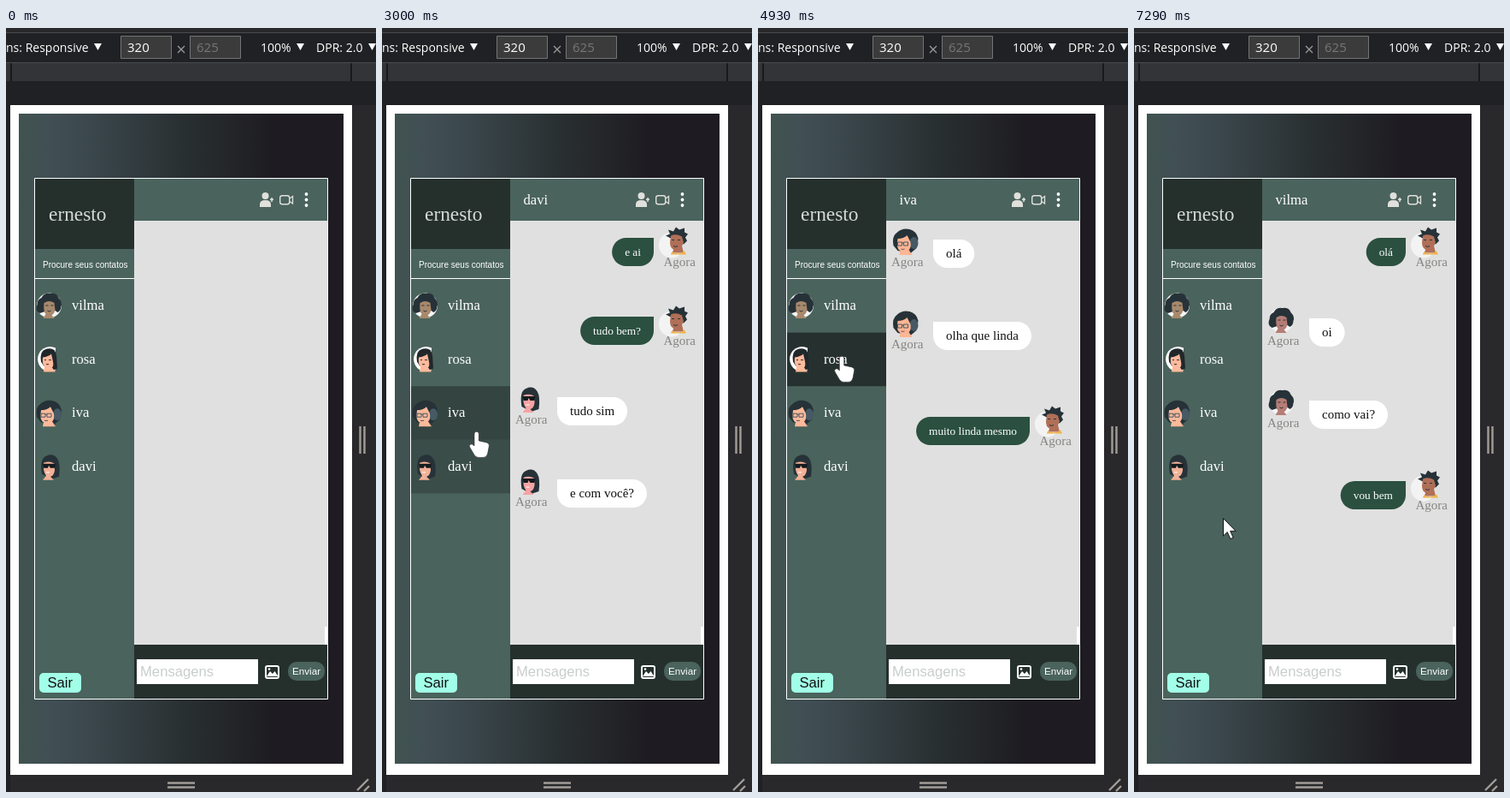
An HTML page for the animation above (8 s loop, 433 px wide and 892 px high).

```html
<!DOCTYPE html>
<html lang="pt">
<head>
<meta charset="utf-8">
<title>Chat</title>
<style>
html, body { margin: 0; width: 100%; height: 100%; overflow: hidden; background: #202124; }
svg { display: block; }
text { font-family: "Liberation Serif", serif; font-size: 16.67px; fill: #fff; }
.ui { font: 14px "Open Sans", sans-serif; }
.sans { font-family: "Liberation Sans", sans-serif; }
.hide { visibility: hidden; }
</style>
</head>
<body>
<svg id="stage" width="433" height="892" viewBox="0 0 433 892">
  <defs>
    <linearGradient id="bg">
      <stop offset="0" stop-color="#40534f"/>
      <stop offset=".1" stop-color="#414f55"/>
      <stop offset=".3" stop-color="#364145"/>
      <stop offset=".5" stop-color="#293032"/>
      <stop offset=".78" stop-color="#1e1c22"/>
    </linearGradient>
    <g id="curly">
      <circle r="14.5" fill="#f5f5f5"/>
      <path d="M-11 9Q-17 6-14-1Q-14-7-9-9Q-6-15 1-14Q9-15 11-9Q16-4 14 1Q14 6 10 8L4 4z" fill="#263238"/>
      <path d="M-6-3Q0-7 6-3L7 5Q6 10 3 11L6 15H-7L-4 10Q-7 7-6-3z" fill="currentColor"/>
      <path d="M-4 0h3M2 0h3M-2 6q2 2 4 0" stroke="#263238" fill="none"/>
    </g>
    <g id="bob">
      <path d="M8-13A14.5 14.5 0 1 0 8 13z" fill="#fff"/>
      <path d="M-9 3Q-11-10-2-12Q8-14 9-4L10 11 6 13-6 8z" fill="#20282c"/>
      <path d="M-7-2Q0-3 3-6L5 3Q6 8 4 10L8 15H-6L-5 9Q-8 6-7-2z" fill="currentColor"/>
      <path d="M-5 1h2M0 1h3M-3 6h3" stroke="#263238"/>
    </g>
    <g id="phones">
      <path d="M-14 5Q-16-6-10-10Q-4-16 5-14Q13-12 15-3L13 8 6 14-9 11z" fill="#263238"/>
      <ellipse cx="10" cy="2" rx="5" ry="7" fill="#455a64"/>
      <path d="M-9-3Q-2-3 2-7L6 1Q7 8 4 10L8 16H-7L-6 11Q-11 9-9-3z" fill="currentColor"/>
      <path d="M-9 1h5v4h-5zM-2 1h5v4h-5zM-4 2h2M-5 9q2 1 4 0" fill="none" stroke="#455a64"/>
    </g>
    <g id="shades">
      <path d="M-9 9Q-12-9-4-12Q4-16 9-9Q13-3 11 12L2 15z" fill="#263238"/>
      <path d="M-7-4Q0-7 6-3L6 5Q5 11 1 12L5 16H-8L-4 11Q-8 6-7-4z" fill="currentColor"/>
      <path d="M-8-3H7L6 2H1L-1-1-2 2H-7z" fill="#141b1f"/>
      <path d="M-4 7h4" stroke="#fff"/>
    </g>
    <g id="self">
      <path d="M-6-10A15 15 0 1 0 6 15z" fill="#f3f3f3"/>
      <path d="M-6-3L-12-6-7-8-9-13-3-11 0-16 4-13 10-15 10-10 14-8 11-4 13 0 9 4z" fill="#263238"/>
      <path d="M-6-6Q0-9 7-5L9 2 7 6 9 14H-4L-3 10Q-7 8-7 2z" fill="#b06f57"/>
      <path d="M-5 13Q3 17 10 12L12 16H-6z" fill="#eeb34a"/>
      <path d="M-5-1h3M2-1h3M-3 6q3 2 5 0" stroke="#263238" fill="none"/>
    </g>
  </defs>

  <!-- browser tools -->
  <path fill="#29292c" d="M0 0h433v5H0zM405 90h28v802h-28zM5 872h428v20H5z"/>
  <path fill="#4a4b4e" d="M0 5h433v1H0zM0 40h433v1H0z"/>
  <path fill="#333438" d="M0 41h433v21H0z"/>
  <path fill="#18191b" d="M5 41h2v21h-2zM403 41h2v21h-2z"/>
  <g class="ui">
    <text class="ui" x="0" y="28">ns: Responsive</text>
    <path fill="#3b3b3b" stroke="#747474" d="M134.5 9.5h59v26h-59zM215.5 9.5h59v26h-59z"/>
    <text class="ui" x="142" y="28" style="font-size:15px">320</text>
    <text class="ui" x="223" y="28" style="font-size:15px;fill:#777">625</text>
    <path d="M201 21l8 8m0-8l-8 8" stroke="#9a9a9a" stroke-width="1.3"/>
    <text class="ui" x="298" y="28">100%</text>
    <text class="ui" x="363" y="28">DPR: 2.0</text>
    <path fill="#fff" d="M103 18h9l-4.500 8zM340 18h9l-4.500 8zM424 18h9l-4.500 8z"/>
  </g>
  <path stroke="#a19c96" stroke-width="2.4" d="M414.500 465v32M419.500 465v32M189 881.500h32M189 886.500h32M411 890l13-13M419 891l6-6"/>

  <!-- page -->
  <path fill="#fff" d="M5 90h400v782H5z"/>
  <path fill="url(#bg)" d="M15 100h380v759H15z"/>
  <path fill="#4a635c" stroke="#fff" d="M33.500 175.500h343v608h-343z"/>
  <path fill="#25302d" d="M34 176h116v82H34zM150 720h226v63H150z"/>
  <path fill="#e0e0e0" d="M150 225h226v495H150z"/>
  <path fill="#fff" d="M373 699h3v21h-3zM153 737h142v29H153z"/>
  <text x="50" y="225" style="font-size:23.4px;fill:#d5d9d8">ernesto</text>
  <text class="sans" x="43" y="280" style="font-size:10px">Procure seus contatos</text>
  <g id="rows"></g>
  <path fill="#fff" d="M34 292h116v1H34z"/>
  <rect x="39" y="753" width="49" height="23" rx="5" fill="#a2ffe8"/>
  <text class="sans" x="48.500" y="770" style="fill:#111">Sair</text>
  <text class="sans" x="157" y="757" style="fill:#c9cecb">Mensagens</text>
  <rect x="304" y="745" width="15" height="14" rx="2" fill="none" stroke="#fff" stroke-width="2"/>
  <path fill="#fff" d="M305 757l4-6 3 3 2.500-3 4 6z"/>
  <circle cx="308" cy="748.500" r="1.300" fill="#fff"/>
  <rect x="330" y="740" width="43" height="22" rx="10" fill="#4a635c"/>
  <text class="sans" x="335" y="755" style="font-size:11.67px">Enviar</text>
  <g fill="#e0e0dc">
    <circle cx="303.500" cy="196" r="4"/>
    <path d="M297 209v-3q0-5 6.500-5t6.500 5v3zM309 199.500h4v1.500h-4zM310.300 198h1.500v5h-1.500z"/>
    <rect x="320.700" y="195.700" width="11" height="10" rx="2.500" fill="none" stroke="#e0e0dc" stroke-width="1.400"/>
    <path d="M332 199l3.500-2.500v8.500L332 202.500" fill="none" stroke="#e0e0dc" stroke-width="1.300"/>
  </g>
  <g fill="#fff"><circle cx="351.500" cy="194" r="1.900"/><circle cx="351.500" cy="200.500" r="1.900"/><circle cx="351.500" cy="207" r="1.900"/></g>
  <text id="title" x="165.500" y="206"></text>
  <g id="chats"></g>
  <g id="cursor" fill="#fff" stroke="#111">
    <path id="arrow" d="M.5.5V21l4.700-4.500 3.600 8 3.400-1.500-3.500-7.700H15z"/>
    <path id="hand" stroke="#222" stroke-width=".6" d="M-2 3a2.700 2.700 0 0 1 5.400 0v8l9 2q3.500 1 3 4l-1.500 8q-1 5.500-6 5.500H3q-3 0-5-3L-7 19q-2-3 1-4 2-.5 4 2z"/>
  </g>
</svg>
<script>
const $ = id => document.getElementById(id);
const LOOP = 8000, FADE = 300;

// who, avatar, skin in the list, skin in the chat, avatar x, opened at, loaded at,
// messages: [sent by me, bubble top, text]
const contacts = [
  { name: "vilma", face: "curly", skin: "#a8896c", chatSkin: "#b57d75", x: 50.5, open: 6160, load: 6290,
    msgs: [[1, 245, "olá"], [0, 339, "oi"], [0, 435, "como vai?"], [1, 529, "vou bem"]] },
  { name: "rosa", face: "bob", skin: "#ffb99b", chatSkin: "#ffb99b", x: 50, open: 5000, load: 5140,
    msgs: [[1, 245, "hey"]] },
  { name: "iva", face: "phones", skin: "#ffb99b", chatSkin: "#ffb593", x: 50, open: 3760, load: 3900,
    msgs: [[0, 247, "olá"], [0, 343, "olha que linda"], [1, 454, "muito linda mesmo"]] },
  { name: "davi", face: "shades", skin: "#f2b298", chatSkin: "#f6a3a3", x: 51, open: 2050, load: 2250,
    msgs: [[1, 245, "e ai"], [1, 337, "tudo bem?"], [0, 431, "tudo sim"], [0, 527, "e com você?"]] }
];

// row, pointer in, pointer out
const hovers = [[3, 1600, 2900], [2, 2900, 4700], [1, 4700, 5370], [0, 5370, 6650],
  [1, 6650, 6760], [2, 6760, 6870], [3, 6870, 6980]];

// time, x, y of the pointer
const path = [[250, 366, 872], [600, 262, 735], [1010, 174, 631], [1220, 147, 610], [1600, 114, 543],
  [1850, 101, 521], [2520, 101, 521], [2900, 109, 481], [3000, 110, 471], [3280, 103, 447],
  [3350, 102, 442], [3540, 102, 442], [3610, 97, 439], [3760, 97, 439], [4170, 103.5, 432],
  [4700, 101, 418], [4950, 97, 380], [5300, 95, 364], [5370, 93, 355], [5470, 91, 336],
  [5760, 86, 322], [6540, 86, 322], [6650, 90, 355], [6980, 102, 543], [7290, 104, 572], [LOOP, 104, 572]];

function add(parent, tag, attrs, text = "") {
  const el = document.createElementNS("http://www.w3.org/2000/svg", tag);
  for (const k in attrs) el.setAttribute(k, attrs[k]);
  el.textContent = text;
  return parent.appendChild(el);
}

function addFace(parent, face, x, y, color) {
  add(parent, "use", { href: "#" + face, transform: `translate(${x} ${y})`, color });
}

function addMessage(parent, c, [mine, y, text]) {
  const style = mine ? "font-size:13.33px" : "font-size:15px;fill:#111";
  const bubble = add(parent, "path", { fill: mine ? "#2b5040" : "#fff" });
  const label = add(parent, "text", { x: mine ? 303 : 220, y: y + 21, style, "text-anchor": mine ? "end" : "start" }, text);
  const w = label.getComputedTextLength();
  const r = 16.5, arc = `a${r} ${r} 0 0 1 `;
  bubble.setAttribute("d", mine
    ? `M${288 - w + r} ${y}H318v${r}${arc}${-r} ${r}H${288 - w + r}${arc}0 -33z`
    : `M205 ${y}H${235 + w - r}${arc}0 33H${205 + r}${arc}${-r} ${-r}z`);
  addFace(parent, mine ? "self" : c.face, mine ? 344 : 172.5, y + (mine ? 3.5 : 2), c.chatSkin);
  add(parent, "text", { x: mine ? 329.5 : 156, y: y + (mine ? 33 : 31), style: "font-size:15px;fill:#858582" }, "Agora");
}

contacts.forEach((c, i) => {
  const y = 293 + i * 62.6;
  c.row = add($("rows"), "rect", { x: 34, y, width: 116, height: 62.6, fill: "#25302d" });
  addFace($("rows"), c.face, c.x, y + 31, c.skin);
  add($("rows"), "text", { x: 77, y: y + 36 }, c.name);
  c.chat = add($("chats"), "g", {});
  c.msgs.forEach(m => addMessage(c.chat, c, m));
});

const ease = p => { p = Math.min(1, Math.max(0, p)); return 1 - (1 - p) ** 2 * (1 - p * p * .3); };
const show = (el, on) => el.classList.toggle("hide", !on);

function pointer(t) {
  const i = Math.max(1, path.findIndex(k => k[0] > t));
  const [t0, x0, y0] = path[i - 1], [t1, x1, y1] = path[i];
  const p = (t - t0) / (t1 - t0);
  return [x0 + (x1 - x0) * p, y0 + (y1 - y0) * p];
}

function draw(t) {
  const current = contacts.filter(c => c.open <= t).sort((a, b) => b.open - a.open)[0];
  $("title").textContent = current ? current.name : "";
  contacts.forEach((c, i) => {
    show(c.chat, c === current && t >= c.load);
    let dark = 0;
    for (const [row, from, to] of hovers)
      if (row === i) dark += ease((Math.min(t, to) - from) / FADE) * (1 - ease((t - to) / FADE));
    c.row.setAttribute("opacity", Math.min(1, dark));
  });
  const over = t >= 1600 && t < 6980;
  show($("arrow"), t >= 250 && !over);
  show($("hand"), over);
  $("cursor").setAttribute("transform", `translate(${pointer(t)})`);
}

const start = performance.now();
function tick() {
  draw((performance.now() - start) % LOOP);
  requestAnimationFrame(tick);
}
tick();
</script>
</body>
</html>
```
